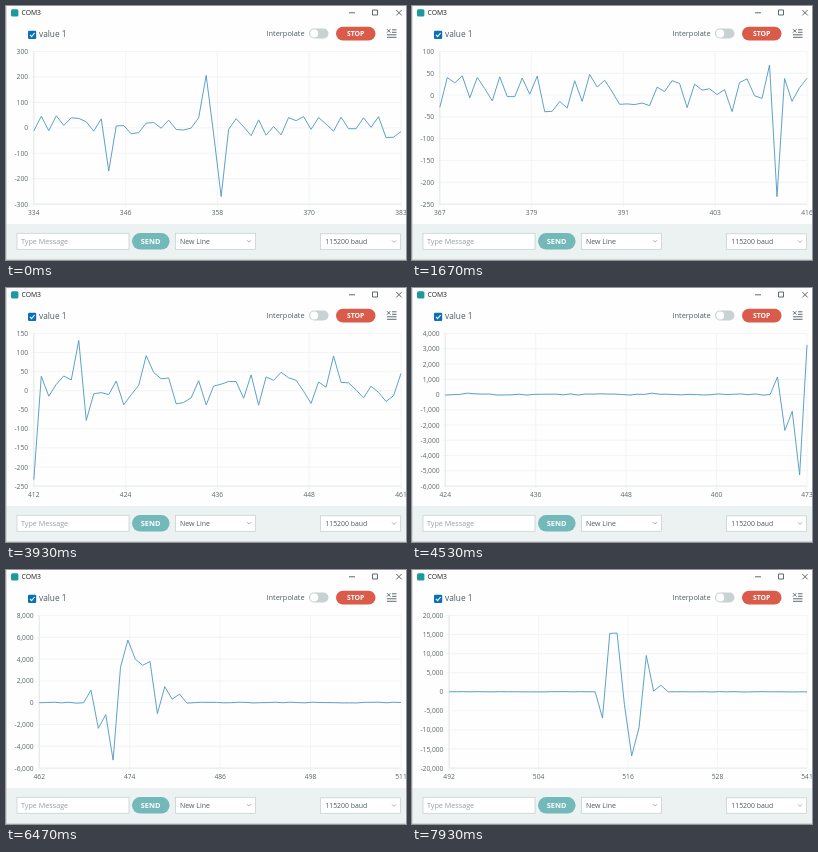
An HTML page that plays this animation: 400 by 254 pixels, repeating every 8000 ms.

```html
<!DOCTYPE html>
<html lang="en">
<head>
<meta charset="utf-8">
<title>Serial plotter</title>
<style>
  html, body { margin: 0; width: 100%; height: 100%; overflow: hidden; background: #fdfefd; }
  svg { display: block; width: 100vw; height: 100vh; font-family: "Open Sans", sans-serif; fill: #4e5b61; }
  .box { fill: #fff; stroke: #c9d2d2; stroke-width: .8; }
  .stroke { fill: none; stroke: #4e5b61; stroke-width: .9; }
  .button { fill: #fff; font-weight: 700; text-anchor: middle; }
  .tick { font-size: 6.7px; fill: #5c666b; }
  .grid { fill: none; stroke: #f0f3f3; stroke-width: .8; }
  .axis { fill: none; stroke: #e0e6e6; stroke-width: .8; }
  .trace { fill: none; stroke: #4d97c6; stroke-width: .9; stroke-linejoin: round; }
</style>
</head>
<body>
<svg viewBox="0 0 400 254">
  <rect width="400" height="254" fill="#fdfefd"/>

  <!-- title bar -->
  <rect x="5" y="3.2" width="7.4" height="7.4" rx="1.5" fill="#1a9a9e"/>
  <text x="15.5" y="9.2" font-size="6.8" fill="#222">COM3</text>
  <path class="stroke" d="M343 6.8h6M366.5 4h5v5h-5zM390.3 4l5.4 5.4m0-5.4l-5.4 5.4"/>

  <!-- toolbar -->
  <rect x="22" y="24.7" width="8.2" height="8.2" rx="1.2" fill="#0a70b8"/>
  <path d="M24 28.9l1.6 1.7 3-3.6" fill="none" stroke="#fff" stroke-width="1.1"/>
  <text x="33" y="30.8" font-size="8.3">value 1</text>
  <text x="260.5" y="30.3" font-size="7.4">Interpolate</text>
  <rect x="303" y="22.5" width="19.5" height="10" rx="5" fill="#c9d2d2"/>
  <circle cx="308.2" cy="27.5" r="4" fill="#fff"/>
  <rect x="330" y="20.8" width="39.5" height="13.8" rx="6.9" fill="#da5b4a"/>
  <text class="button" x="349.7" y="30.2" font-size="6.9">STOP</text>
  <path class="stroke" d="M381 23.2l3.4 3.4m0-3.4l-3.4 3.4M386 23.8h4.5M386 26.3h4.5M381 28.8h9.5M381 31.3h9.5"/>

  <g id="chart"></g>

  <!-- message bar -->
  <rect y="218" width="400" height="35" fill="#ecf1f1"/>
  <rect class="box" x="11" y="227.3" width="112" height="16"/>
  <text x="15" y="238" font-size="7.2" fill="#95a0a3">Type Message</text>
  <rect x="126" y="227" width="37.6" height="16.6" rx="8.3" fill="#73b9b9"/>
  <text class="button" x="144.6" y="238" font-size="7.4">SEND</text>
  <rect class="box" x="169.5" y="227.3" width="80" height="16"/>
  <text x="174" y="238" font-size="7">New Line</text>
  <rect class="box" x="314.5" y="227.8" width="80" height="15.5"/>
  <text x="319.3" y="238.2" font-size="6.9">115200 baud</text>
  <path d="M241 234.2l2 2 2-2M386 234.4l2 2 2-2" fill="none" stroke="#95a0a3" stroke-width=".8"/>
  <path d="M0 253.5H400M.3 0V254" fill="none" stroke="#b8bebf" stroke-width=".6"/>
</svg>
<script>
const LOOP = 8000, FRAMES = 120, FIRST = 334, SPAN = 49;
const TOP = 45.5, BOTTOM = 198.1, RIGHT = 395;

// Key peaks by sample number; everything between them is seeded noise.
const peaks = {
  344: [-170],
  357: [206, -25, -270],
  411: [69, -233],
  418: [132, -78],
  427: [92],
  452: [91],
  469: [1150, -2350, -1100, -5270, 3250, 5750, 4000, 3430, 3780, -1000, 1470, 320, 790],
  513: [-6900, 15300, 15400, -3300, -16800, -9400, 9500, 200, 1700]
};

function noise(i) {
  const x = Math.sin(i * 12.9898) * 43758.5453;
  return (x - Math.floor(x) - 0.45) * 90;
}

function sampleAt(i) {
  for (const start in peaks) {
    const value = peaks[start][i - start];
    if (value !== undefined) return value;
  }
  return noise(i);
}

const scrolledAt = frame => Math.max(0, Math.floor(1.33 * frame - 0.2));

function niceStep(x) {
  const power = 10 ** Math.floor(Math.log10(x));
  return [1, 2, 5, 10].find(m => m * power >= x * 0.9999) * power;
}

// Axis limits: 5% grace on the half range, at most ten intervals.
function axisFor(values) {
  let min = Math.min(...values), max = Math.max(...values);
  const grace = (max - min) / 2 * 0.05;
  min -= grace;
  max += grace;
  let step = niceStep((max - min) / 10);
  const count = Math.ceil(max / step) - Math.floor(min / step);
  if (count > 10) step = niceStep(count * step / 10);
  return { low: Math.floor(min / step) * step, high: Math.ceil(max / step) * step, step };
}

const labelWidth = text => [...text].reduce((w, c) => w + (c === "," ? 1.7 : c === "-" ? 2.2 : 3.8), 0);
const label = (x, y, anchor, text) => `<text class="tick" x="${x}" y="${y}" text-anchor="${anchor}">${text}</text>`;

function chartMarkup(first) {
  const values = Array.from({ length: SPAN + 1 }, (_, i) => sampleAt(first + i));
  const { low, high, step } = axisFor(values);
  const ticks = [];
  for (let v = high; v >= low; v -= step) ticks.push({ v, text: v.toLocaleString("en-US") });

  const left = 14.2 + Math.max(...ticks.map(t => labelWidth(t.text)));
  const xAt = i => left + (RIGHT - left) * i / SPAN;
  const yAt = v => TOP + (BOTTOM - TOP) * (high - v) / (high - low);

  let grid = "", labels = "";
  for (const { v, text } of ticks) {
    grid += `M${left - 3} ${yAt(v)}H${RIGHT}`;
    labels += label(left - 5.7, yAt(v) + 2.5, "end", text);
  }
  for (let q = 0; q <= 4; q++) {
    const i = SPAN * q / 4;
    grid += `M${xAt(i)} ${TOP}V${BOTTOM + 3}`;
    labels += label(xAt(i), 209.3, "middle", Math.floor(first + i));
  }
  const points = values.map((v, i) => `${xAt(i).toFixed(2)},${yAt(v).toFixed(2)}`).join(" ");
  return `<path class="grid" d="${grid}"/><path class="axis" d="M${left} ${TOP}V${BOTTOM}H${RIGHT}"/>` +
    `${labels}<polyline class="trace" points="${points}"/>`;
}

const chart = document.getElementById("chart");
let shown = -1;

function draw() {
  const time = performance.now() % LOOP;
  const frame = Math.floor((time + 5) * FRAMES / LOOP) % FRAMES;
  const first = FIRST + scrolledAt(frame);
  if (first !== shown) {
    chart.innerHTML = chartMarkup(first);
    shown = first;
  }
  requestAnimationFrame(draw);
}
draw();
</script>
</body>
</html>
```
